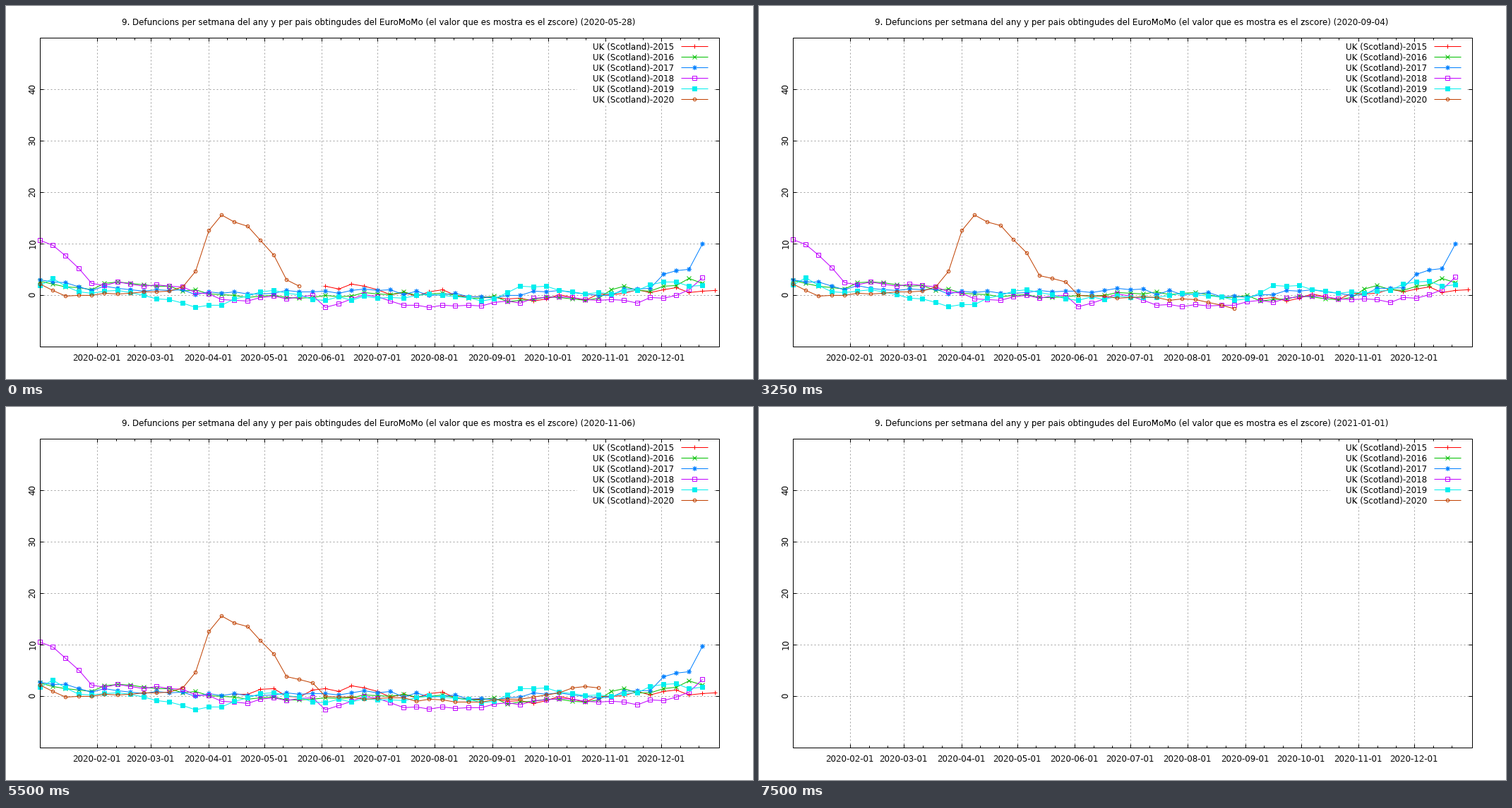
Write a matplotlib script that moves like this. It is 1058x529 px and loops after 7.75 s.

```python
import numpy as np
import matplotlib.pyplot as plt
from matplotlib.animation import FuncAnimation
from matplotlib.patches import Rectangle

W, H, DPI = 1058, 529, 100
FRAMES, INTERVAL = 31, 250
PX = 72 / DPI
LEFT, RIGHT, TOP, BOTTOM = 48, 1010, 45, 483
DAY = (RIGHT - LEFT) / 366
UNIT = (BOTTOM - TOP) / 60
FONT = dict(family="DejaVu Sans", size=11.85 * PX, color="black")
TITLE = ("9. Defuncions per setmana del any y per pais obtingudes del EuroMoMo "
         "(el valor que es mostra es el zscore) ({})")
plt.rcParams["text.hinting"] = "native"

# Per year: colour, marker, marker size, week-to-week noise, turning points.
YEARS = {
    2015: ("#ff0000", "+", 6, .6,
           [(15, .7), (17, 1.6), (19, .2), (22, 1.8), (26, 1.2), (36, -.7),
            (44, .2), (52, 1)]),
    2016: ("#00c000", "x", 6, .35,
           [(0, 2.8), (4, 1.2), (6, 2.6), (10, 1.8), (14, .2), (22, 0),
            (28, .7), (37, -.9), (43, -.5), (45, 1.8), (47, .9), (50, 3.3),
            (51, 2.4)]),
    2017: ("#0080ff", (8, 2, 0), 7, .4,
           [(0, 3), (3, 1.7), (10, 1), (12, .2), (26, 1), (35, -.5),
            (40, 1), (43, 0), (47, 1.4), (48, 4.1), (50, 5.1), (51, 10)]),
    2018: ("#c000ff", "s", 6, .3,
           [(0, 10.8), (1, 9.8), (4, 2.4), (10, 1.8), (15, -.9), (21, 0),
            (22, -2.3), (25, .2), (28, -1.9), (34, -2), (40, -.2),
            (46, -1.4), (50, 1.1), (51, 3.5)]),
    2019: ("#00eeee", "s", 6, .35,
           [(0, 2), (1, 3.4), (3, .7), (6, 1), (12, -2.3), (14, -1.8),
            (18, 1), (21, -.8), (29, 0), (35, -.7), (37, 1.8), (44, .3),
            (48, 2.6), (51, 2)]),
    2020: ("#c04000", "o", 4.5, .2,
           [(0, 2.2), (2, -.2), (10, .8), (11, 1.6), (12, 4.7), (13, 12.6),
            (14, 15.6), (16, 13.5), (18, 8.2), (19, 3.8), (21, 2.6),
            (22, 0), (33, -1.1), (38, -.1), (45, 4.3), (51, 2)]),
}

# First frame of each data revision and its effect on the earlier years.
REVISIONS = {0: -.05, 1: .05, 14: 0, 18: -.25, 23: -.05}


def day_x(day):
    return np.floor(LEFT + DAY * day)


def score_y(score):
    return np.round(BOTTOM - UNIT * (score + 10))


def date_of(frame):
    if frame == 0:
        return "2020-05-28"
    return str(np.datetime64("2021-01-01") - 7 * (FRAMES - 1 - frame))


def full_year(year):
    noise, points = YEARS[year][3:]
    known, score = zip(*points)
    week = np.arange(known[0], known[-1] + 1)
    jitter = np.random.default_rng(year).uniform(-1.5, 1.5, len(week)) * noise
    jitter[np.isin(week, known)] = 0
    return week, np.interp(week, known, score) + jitter


SERIES = {year: full_year(year) for year in YEARS}


def series(year, frame):
    """Weeks and scores of one year as known at the given frame."""
    last = 20 if frame == 0 else 21 + frame
    revision = max(start for start in REVISIONS if start <= frame)
    week, score = SERIES[year]
    if year == 2020:
        # The newest weeks are under-reported at first.
        lag = 1.5 * .5 ** (last - week)
        shown = week <= last
        return week[shown], (score - lag)[shown]
    score = score + REVISIONS[revision]
    if year == 2015:
        shown = week >= (last + 2 if revision < 18 else last - 28)
        return week[shown], score[shown]
    return week, score


fig = plt.figure(figsize=(W / DPI, H / DPI), dpi=DPI, facecolor="white")
ax = fig.add_axes([0, 0, 1, 1])
# Whole coordinates fall just short of a pixel's middle, so snapping keeps them.
ax.set_xlim(-.4, W - .4)
ax.set_ylim(H - .4, -.4)
ax.axis("off")


def line(x, y, color="black", z=3, **kw):
    return ax.plot(x, y, color=color, lw=PX, zorder=z,
                   solid_capstyle="butt", **kw)[0]


def x_tick(x, size):
    line([x, x], [BOTTOM, BOTTOM - size])
    line([x, x], [TOP, TOP + size])


dots = dict(color="#a0a0a0", z=1, ls=(0, (2, 3)))
for value in range(0, 50, 10):
    y = score_y(value)
    line([LEFT, RIGHT], [y, y], **dots)
    line([LEFT, LEFT + 5], [y, y])
    line([RIGHT, RIGHT - 5], [y, y])
    ax.text(41, y - 1, str(value), rotation=90, rotation_mode="anchor",
            ha="center", va="baseline", **FONT)

for month in range(2, 13):
    date = np.datetime64(f"2020-{month:02d}-01")
    day = (date - np.datetime64("2020-01-01")).astype(int)
    x = day_x(day)
    line([x, x], [BOTTOM, TOP], **dots)
    x_tick(x, 5)
    for third in (1, 2):
        x_tick(day_x(day + third * 10.14), 3)
    ax.text(x - 1, 502.6, str(date), ha="center", va="baseline", **FONT)

ax.add_patch(Rectangle((809, 50), 192, 90, fc="white", ec="none", zorder=2))
ax.add_patch(Rectangle((LEFT, TOP), RIGHT - LEFT, BOTTOM - TOP, fill=False,
                       ec="black", lw=PX, zorder=6))

curves = {}
for i, (year, (color, marker, size, *_)) in enumerate(YEARS.items()):
    mark = dict(marker=marker, markersize=size * PX, markeredgewidth=PX,
                markerfacecolor=color if year == 2019 else "none")
    y = 57 + 15 * i
    ax.text(946, y + 4.6, f"UK (Scotland)-{year}", ha="right",
            va="baseline", **FONT)
    line([956, 994], [y, y], color, 4)
    line([975], [y], color, 4, **mark)
    curves[year] = line([], [], color, 4 + i / 10, **mark)

title = ax.text(527, 26.3, "", ha="center", va="baseline", **FONT)


def draw(frame):
    title.set_text(TITLE.format(date_of(frame)))
    for year, curve in curves.items():
        if frame == FRAMES - 1:
            curve.set_data([], [])
        else:
            week, score = series(year, frame)
            curve.set_data(day_x(7 * week), score_y(score))
    return [title, *curves.values()]


anim = FuncAnimation(fig, draw, frames=FRAMES, interval=INTERVAL,
                     repeat=True, repeat_delay=0, blit=False)
plt.show()
```
